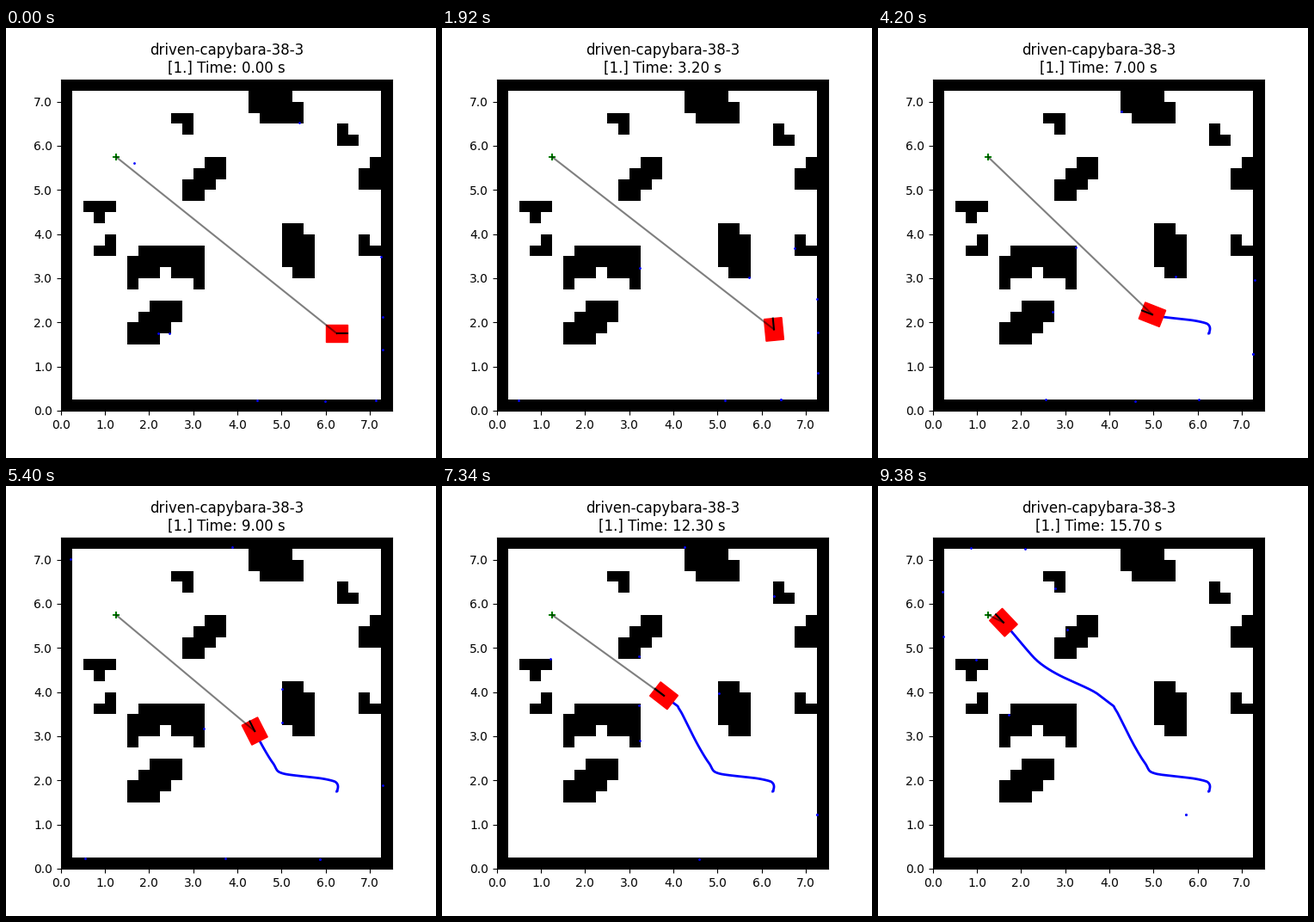
Write a matplotlib script that moves like this. It is 500 px wide and 500 px high and loops after 9400 ms.

```python
import numpy as np
import matplotlib.pyplot as plt
from matplotlib.animation import FuncAnimation
from matplotlib.patches import Polygon

SIZE, CELL, N = 7.5, 0.25, 30
GOAL = (1.25, 5.75)
LENGTH, WIDTH = 0.5, 0.4
RANGE, RAY_STEP = 6.0, 0.05
DT, STEPS = 0.1, 158

# Poses the robot passes: time, x, y, heading in degrees
POSES = np.array([
    (0.1, 6.25, 1.75, 0),
    (2.5, 6.27, 1.806, 74),
    (4.9, 6.213, 1.97, 147.7),
    (5.7, 5.84, 2.053, 173),
    (6.6, 5.13, 2.136, 171),
    (7.0, 4.971, 2.178, 158.6),
    (8.0, 4.797, 2.404, 127),
    (8.8, 4.476, 2.95, 117),
    (9.5, 4.203, 3.495, 117),
    (10.0, 4.12, 3.635, 119),
    (10.9, 4.082, 3.694, 144.1),
    (12.4, 3.755, 3.943, 142),
    (13.7, 3.034, 4.3, 155.4),
    (14.5, 2.375, 4.7, 139),
    (14.8, 2.165, 4.92, 131),
    (15.7, 1.6, 5.578, 133.5),
])


def make_grid():
    """Occupancy grid, built with row 0 at the top."""
    grid = np.zeros((N, N), bool)

    def box(col, row, w, h, value=True):
        grid[row:row + h, col:col + w] = value

    def stairs(col, row, w, h, count, dx):
        for k in range(count):
            box(col + k * dx, row + k, w, h)

    def notched(col, row, dx, dy, h=2):
        box(col, row, 2, h)
        box(col + dx, row + dy, 1, 1, False)

    grid[[0, -1]] = grid[:, [0, -1]] = True
    stairs(17, 1, 4, 2, 2, 1)
    stairs(20, 13, 2, 4, 2, 1)
    stairs(13, 7, 2, 2, 3, -1)
    stairs(8, 20, 3, 2, 3, -1)
    notched(10, 3, 0, 1)
    notched(25, 4, 1, 0)
    notched(3, 14, 0, 0)
    notched(27, 14, 1, 0)
    notched(27, 7, 0, 0, h=3)
    # T piece
    box(2, 11, 3, 1)
    box(3, 12, 1, 1)
    # Arch
    box(7, 15, 6, 1)
    box(6, 16, 7, 2)
    box(9, 17, 1, 1, False)
    box(6, 18, 1, 1)
    box(12, 18, 1, 1)
    return grid[::-1]


def unit(angle):
    return np.stack([np.cos(angle), np.sin(angle)], axis=-1)


def drive(t):
    """Path through the poses, always tangent to the heading."""
    keys, spots, turn = POSES[:, 0], POSES[:, 1:3], np.radians(POSES[:, 3])
    t = np.clip(t, keys[0], keys[-1])
    pace = np.hypot(*np.diff(spots, axis=0).T) / np.diff(keys)
    before, after = np.r_[pace[0], pace], np.r_[pace, pace[-1]]
    vel = unit(turn) * (2 * before * after / (before + after))[:, None]

    i = np.clip(np.searchsorted(keys, t, side="right") - 1, 0, len(keys) - 2)
    h = (keys[i + 1] - keys[i])[:, None]
    u = (t - keys[i])[:, None] / h
    path = ((1 + 2 * u) * (1 - u) ** 2 * spots[i]
            + u * (1 - u) ** 2 * h * vel[i]
            + u * u * (3 - 2 * u) * spots[i + 1]
            + u * u * (u - 1) * h * vel[i + 1])
    return path, np.interp(t, keys, turn)


def scan(pos, theta):
    """March the range sensor's rays until each meets a wall."""
    rays = unit(theta + np.linspace(-np.pi, np.pi, 10))
    r = np.arange(1, round(RANGE / RAY_STEP) + 1) * RAY_STEP
    points = pos + rays[:, None] * r[:, None]
    col, row = np.clip(points // CELL, 0, N - 1).astype(int).transpose(2, 0, 1)
    hit = grid[row, col]
    hit[:, -1] = True
    return points[np.arange(len(rays)), hit.argmax(axis=1)]


grid = make_grid()
times = np.arange(STEPS) * DT
path, theta = drive(times)
scans = [scan(p, a) for p, a in zip(path, theta)]
corners = np.array([(1, 1), (-1, 1), (-1, -1), (1, -1)]) * (LENGTH / 2, WIDTH / 2)

fig, ax = plt.subplots(figsize=(5, 5), dpi=100)
ax.imshow(grid, cmap="binary", origin="lower", extent=(0, SIZE, 0, SIZE),
          interpolation="nearest")
for axis in (ax.xaxis, ax.yaxis):
    axis.set_ticks(range(8))
    axis.set_major_formatter("{x:.1f}")
title = ax.set_title("", y=1.0)

trail, = ax.plot([], [], "b", lw=2, zorder=0.5)
body = ax.add_patch(Polygon(corners, color="red"))
ax.scatter(*GOAL, marker="+", color="green")
dots = ax.scatter([], [], s=1, color="blue")
to_goal, = ax.plot([], [], "k", alpha=0.5)
nose, = ax.plot([], [], "k")
ax.set_xlim(0, SIZE)
ax.set_ylim(0, SIZE)


def update(i):
    # Steps are held for 20 ms and 100 ms in turn
    n = 2 * (i // 6) + (i % 6 > 0)
    pos = path[n]
    fwd, side = unit(theta[n]), unit(theta[n] + np.pi / 2)
    trail.set_data(*path[:n + 1].T)
    body.set_xy(pos + corners @ np.array([fwd, side]))
    to_goal.set_data(*zip(pos, GOAL))
    nose.set_data(*zip(pos, pos + fwd * LENGTH / 2))
    dots.set_offsets(scans[n])
    title.set_text(f"driven-capybara-38-3\n[1.] Time: {times[n]:.2f} s")
    return trail, body, to_goal, nose, dots, title


anim = FuncAnimation(fig, update, frames=470, interval=20, repeat=True,
                     repeat_delay=0, blit=False)
plt.show()
```
